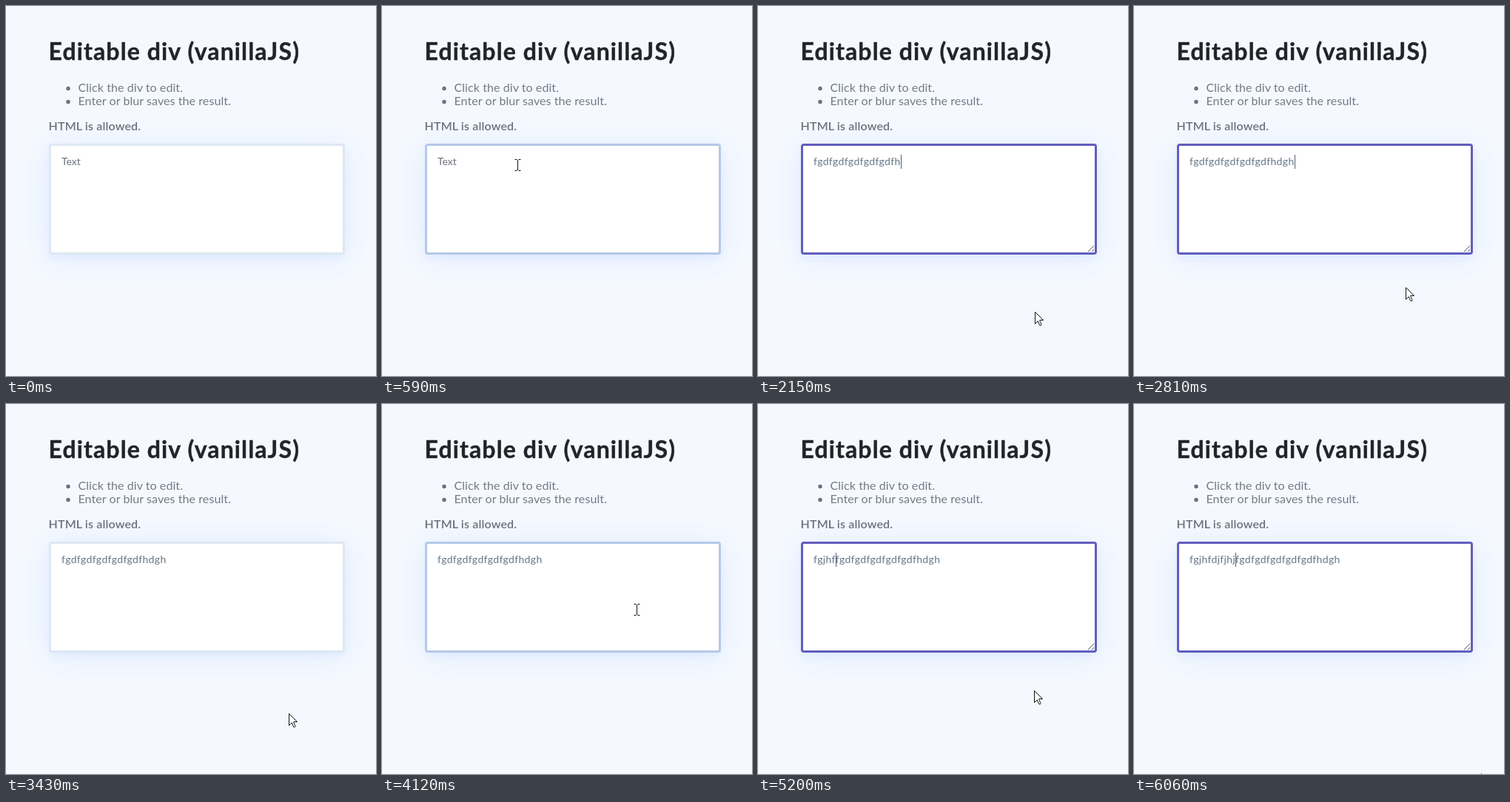
An HTML page that plays this animation: 500x500 px, repeating every 6090 ms.

```html
<!DOCTYPE html>
<html lang="en">
<head>
<meta charset="utf-8">
<title>Editable div</title>
<style>
  html, body { margin: 0; width: 100%; height: 100%; overflow: hidden; background: #f5f9ff; }
  #stage { position: relative; width: 500px; height: 500px; overflow: hidden; }
  #box {
    position: absolute; left: 58px; top: 186px; width: 400px; height: 150px;
    box-sizing: border-box; border: 3px solid #dee7f3; border-radius: 4px; background: #fff;
    box-shadow: 0 4px 10px rgba(70, 140, 255, .06), 0 5px 40px rgba(70, 140, 255, .12);
  }
  #box.hover { border-color: #b5c9e8; }
  #box.editing { border-color: #625dbe; }
  svg { position: absolute; left: 0; top: 0; font-family: Lato, "Open Sans", sans-serif; }
  text { white-space: pre; fill: #737a85; font-size: 16px; letter-spacing: .08px; }
  #title {
    fill: #212529; stroke: #212529; stroke-width: .4px;
    font-size: 32px; font-weight: 700; letter-spacing: 1.12px;
  }
  #note { fill: #6a717c; font-weight: 600; letter-spacing: .16px; }
  #value { fill: #678; font-size: 14px; letter-spacing: .33px; }
  #value.placeholder { fill: #6a717c; letter-spacing: 0; }
</style>
</head>
<body>
<div id="stage">
  <div id="box"></div>
  <svg width="500" height="500" viewBox="0 0 500 500">
    <text id="title" x="57.5" y="73">Editable div (vanillaJS)</text>
    <g fill="#6a717c"><circle cx="84" cy="111.5" r="2.7"/><circle cx="84" cy="129.5" r="2.7"/></g>
    <text x="97.5" y="116">Click the div to edit.</text>
    <text x="97.5" y="134">Enter or blur saves the result.</text>
    <text id="note" x="57.5" y="168">HTML is allowed.</text>
    <text id="value" x="75" y="215"></text>
    <rect id="caret" y="201" width="1" height="19" fill="#4f6072"/>
    <path id="grip" d="M446 332l8-8M451 332l3-3" stroke="#555" fill="none"/>
    <g id="pointer">
      <circle id="click" r="12" fill="#ff0"/>
      <path id="arrow" d="M.5 .5V16.5L4.2 12.8L6.7 18.5H8.5L9 17.5L6.8 12.5V11.5H11.5Z" fill="#fff" stroke="#111"/>
      <path id="beam" d="M-4 -7.5H-1M1 -7.5H4M-4 7.5H-1M1 7.5H4M0 -7V7" transform="translate(.5 0)" stroke="#111" fill="none"/>
    </g>
  </svg>
</div>
<script>
const LOOP = 6090;
const FIRST = "fgdfgdfgdfgdfgdfhdgh";
const INSERT = "fgjhfdjfjhj";
const FOCUS = 680, BLUR = 3020, REFOCUS = 4660;
const ENTER = 200, LEAVE = 5680, RETURN = 6020;

const start = { x: 446, y: 413 };
const moves = [
  { from: ENTER, to: 430, x: 215, y: 167 },
  { from: 430, to: 670, x: 167, y: 239 },
  { from: 1070, to: 1200, x: 176, y: 256 },
  { from: 1300, to: 2120, x: 374, y: 413 },
  { from: 2180, to: 2550, x: 367, y: 380 },
  { from: 2810, to: 2990, x: 382, y: 418 },
  { from: 4040, to: 4115, x: 344, y: 278 },
  { from: 4170, to: 4640, x: 250, y: 240 },
  { from: 4800, to: 5180, x: 373, y: 387 },
  { from: 5230, to: LEAVE, x: 440, y: 501 },
  { from: RETURN, to: 6060, x: 469, y: 499 }
];
const clicks = [{ down: FOCUS, up: 910 }, { down: BLUR, up: 3430 }, { down: REFOCUS, up: 4800 }];

const el = Object.fromEntries(
  [...document.querySelectorAll("[id]")].map(node => [node.id, node]));
const within = (t, from, to) => t >= from && t < to;
const progress = (t, from, to) => Math.max(0, Math.min(1, (t - from) / (to - from)));
const show = (node, on) => node.style.visibility = on ? "visible" : "hidden";

// Each move starts wherever the previous one ended.
function pointerAt(t) {
  return moves.reduce((p, m) => {
    const k = progress(t, m.from, m.to);
    return { x: p.x + (m.x - p.x) * k, y: p.y + (m.y - p.y) * k };
  }, start);
}

// The first burst of typing speeds up; the second is steady.
function contentAt(t) {
  if (t >= REFOCUS) {
    const typed = Math.floor(INSERT.length * progress(t, 4760, 5660));
    return { value: INSERT.slice(0, typed) + FIRST, typed };
  }
  if (t < 1070) return { value: "Text", typed: 0 };
  const typed = 1 + Math.floor((FIRST.length - 1) * progress(t, 1070, 2300) ** 1.28);
  return { value: FIRST.slice(0, typed), typed };
}

function drawField(t, hovered) {
  const editing = within(t, FOCUS, BLUR) || t >= REFOCUS;
  el.box.className = editing ? "editing" : hovered ? "hover" : "";
  show(el.grip, editing);

  const { value, typed } = contentAt(t);
  el.value.textContent = value;
  el.value.classList.toggle("placeholder", t < 1070);

  const offset = typed ? el.value.getSubStringLength(0, typed) : 0;
  el.caret.setAttribute("x", Math.round(75 + offset));
  show(el.caret, editing && !within(t, 2830, BLUR));
}

function drawPointer(t, { x, y }, inside) {
  const visible = within(t, ENTER, LEAVE) || t >= RETURN;
  el.pointer.setAttribute("transform", `translate(${Math.round(x)} ${Math.round(y)})`);
  show(el.arrow, visible && !inside);
  show(el.beam, visible && inside);

  const press = clicks.find(({ down, up }) => within(t, down, up));
  el.click.setAttribute("opacity", press ? .45 * (1 - progress(t, press.up - 100, press.up)) : 0);
}

function draw(now) {
  const t = now % LOOP;
  const pointer = pointerAt(t);
  const inside = within(pointer.x, 58, 458) && within(pointer.y, 186, 336);
  drawField(t, inside);
  drawPointer(t, pointer, inside);
  requestAnimationFrame(draw);
}
draw(0);
</script>
</body>
</html>
```
